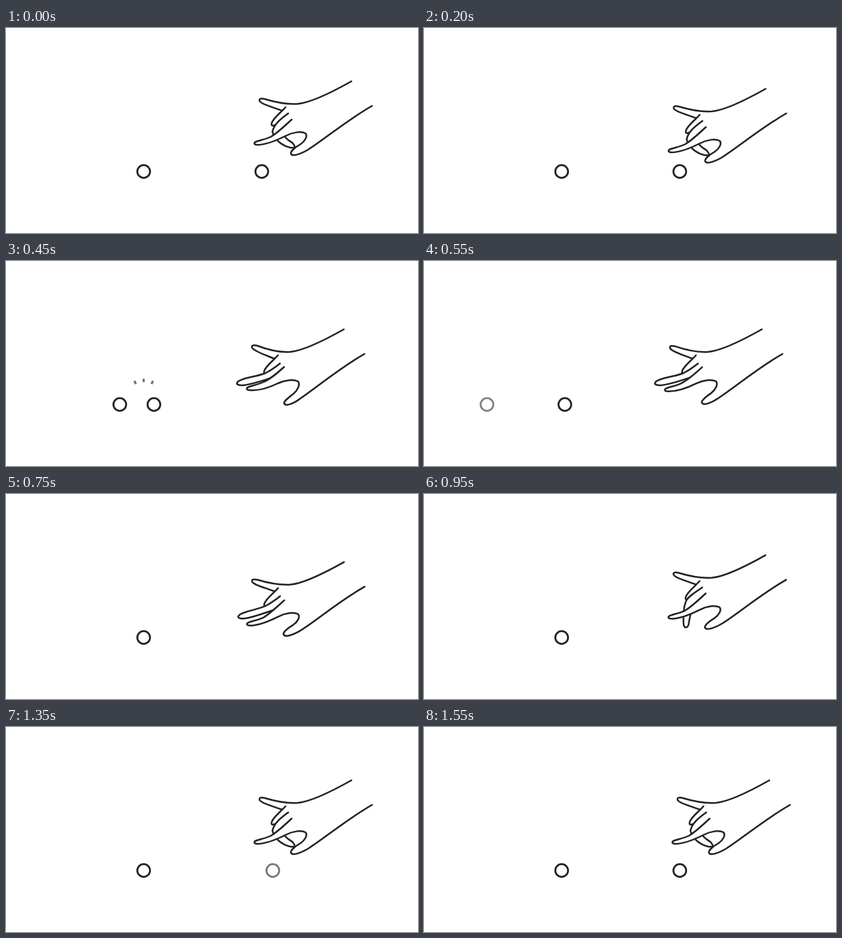
An HTML page for the animation above (1900 ms loop, 600x300 px).

```html
<!DOCTYPE html>
<html lang="en">
<head>
<meta charset="utf-8">
<title>Flick</title>
<style>
  html, body { margin: 0; width: 100%; height: 100%; overflow: hidden; background: #fff; }
  svg { display: block; width: 100vw; height: 100vh; }
  #hand { fill: #fff; stroke: #222; stroke-width: 2.5; stroke-linecap: round; stroke-linejoin: round; }
  .ball { fill: none; stroke: #222; stroke-width: 2.7; }
  #sparks { stroke: #222; stroke-width: 3.2; }
</style>
</head>
<body>
<svg viewBox="0 0 600 300">
  <circle class="ball" id="resting" cy="210" r="9.3"/>
  <circle class="ball" id="flicked" cy="210" r="9.3"/>
  <g id="sparks">
    <path d="M0 -2.5V2.5"/><path d="M0 -2.5V2.5"/><path d="M0 -2.5V2.5"/>
  </g>
  <g id="hand">
    <path d="M407 116C400 124 389 132 387 139C386 143 388 144 391 142"/>
    <path id="finger"/>
    <path id="palm"/>
    <path id="index" fill="none"/>
  </g>
</svg>
<script>
const LOOP = 1900;
const $ = id => document.getElementById(id);

// Flicking finger: curled, pointing down, stretched out
const FINGER = [
  "M411 125C400 133 390 141 388 152C391 163 401 172 414 175C422 176 422 174 417 168C410 163 404 161 404 150",
  "M411 125C400 133 389 139 387 146C383 157 384 170 385 179C386 187 392 187 393 180C394 168 395 156 404 150",
  "M410 128C400 136 395 139 389 142C379 146 370 147 359 150C345 154 343 160 356 160C373 158 387 152 404 147"
];
// Lower finger, thumb and arm: relaxed, splayed
const PALM = [
  "M416 134C405 144 396 153 386 159C378 163 370 164 365 166C360 168 361 171 366 171C380 171 395 164 407 158C418 152 430 151 436 154C440 158 435 166 429 170C420 175 414 181 415 184C417 189 430 184 440 178C465 162 495 136 533 114",
  "M416 133C405 143 396 151 386 155C378 159 370 160 365 162C360 164 361 167 366 167C380 168 395 163 407 157C418 152 430 151 436 154C440 158 436 167 430 172C421 179 416 183 416 186C418 192 431 186 440 179C465 162 495 136 533 114"
];
// Upper finger and arm: relaxed, splayed
const INDEX = [
  "M503 78C480 91 447 109 425 111C408 112 390 108 377 104C371 102.5 368 103.5 369.5 107C372 112 390 116 402 121",
  "M503 78C480 91 447 109 425 111C408 112 390 107 377 102C371 100.5 368 101.5 369.5 105C372 110 390 116 402 121"
];

const clamp = x => Math.min(1, Math.max(0, x));
const ramp = (t, from, to) => clamp((t - from) / (to - from));
const easeInOut = x => x < .5 ? 2 * x * x : 1 - 2 * (1 - x) ** 2;
const mix = (a, b, p) => a + (b - a) * p;

function setMixedPath(id, [a, b], p) {
  const target = b.match(/[\d.]+/g);
  let i = 0;
  $(id).setAttribute("d", a.replace(/[\d.]+/g, n => mix(+n, +target[i++], p).toFixed(2)));
}

function placeBall(id, x, opacity) {
  $(id).setAttribute("cx", x);
  $(id).setAttribute("opacity", opacity);
}

function drawHand(t) {
  const back = easeInOut(ramp(t, 700, 1215));
  const down = easeInOut(ramp(t, 100, 302)) - back;
  $("hand").setAttribute("transform", `translate(${-11 * down} ${22 * down})`);

  const stretch = 2 * (ramp(t, 250, 350) - back);
  const pose = stretch < 1 ? 0 : 1;
  setMixedPath("finger", FINGER.slice(pose), stretch - pose);

  const splay = ramp(t, 250, 350) - ramp(t, 470, 650);
  setMixedPath("palm", PALM, splay);
  setMixedPath("index", INDEX, splay);
}

function drawBalls(t) {
  const hit = ramp(t, 404, 604);
  if (t < 1250) {
    const x = hit ? 200.5 + 20 * (1 - hit) ** 1.1 : mix(372.5, 220.5, ramp(t, 300, 404));
    placeBall("resting", 200.5 - 148 * hit, 1 - ramp(t, 475, 650));
    placeBall("flicked", x, 1);
  } else {
    // The flicked ball now rests on the left; a new one rolls in
    placeBall("resting", 200.5, 1);
    placeBall("flicked", 372.5 + 83 * (1 - ramp(t, 1250, 1550)) ** 4, ramp(t, 1250, 1415));
  }
}

function drawSparks(t) {
  const p = ramp(t, 400, 550);
  $("sparks").setAttribute("opacity", p > 0 ? .95 * (1 - p) : 0);
  [...$("sparks").children].forEach((tick, i) =>
    tick.setAttribute("transform",
      `translate(200.5 202.3) rotate(${(i - 1) * 27}) translate(0 ${-24.5 - 9 * p})`));
}

function frame(now) {
  const t = now % LOOP;
  drawHand(t);
  drawBalls(t);
  drawSparks(t);
  requestAnimationFrame(frame);
}
frame(performance.now());
</script>
</body>
</html>
```
